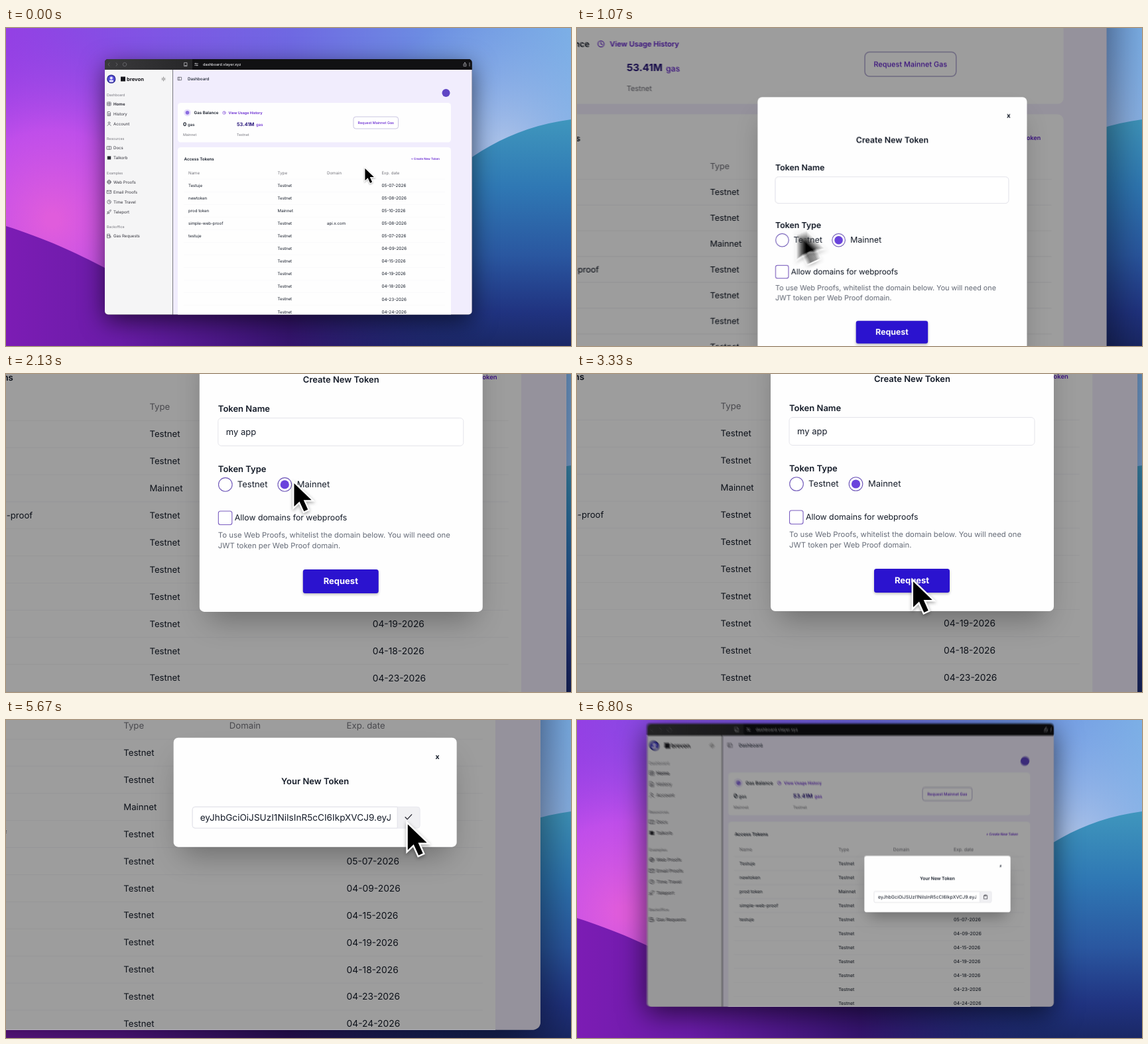
An HTML page with a canvas that plays this animation: 852 px wide and 480 px high, repeating every 6870 ms.

```html
<!DOCTYPE html>
<html lang="en">
<head>
<meta charset="utf-8">
<title>Create a token</title>
<style>
html, body { margin: 0; width: 100%; height: 100%; overflow: hidden; background: #2a1a6a; }
canvas { display: block; width: 852px; height: 480px; }
</style>
</head>
<body>
<canvas id="stage" width="852" height="480"></canvas>
<script>
const W = 852, H = 480, LOOP = 6870, STEP = 1000 / 15, SHUTTER = 16;
const ZOOM = 2.145;
const FRAME = [149, 47, 553.6, 385.5];
const out = document.getElementById('stage').getContext('2d');

function layer() {
  const c = document.createElement('canvas');
  c.width = W;
  c.height = H;
  return c.getContext('2d');
}
const back = layer(), g = layer();
g.textRendering = 'geometricPrecision';

const INK = '#141b28', GREY = '#75757d', PURPLE = '#6423d0', LINE = '#f2f2f5';

// Motion

const spring = (ms, w) => {
  const x = Math.max(0, ms) / 1000 * w;
  return 1 - (1 + x) * Math.exp(-x);
};
const ease = p => p < 0 ? 0 : p > 1 ? 1 : p * p * (3 - 2 * p);

// start, stiffness, [scale, x, y]
const HOME = [1, 0, 0];
const shots = [
  [451, 6.5, [ZOOM, -699, -261]],
  [1411, 10, [ZOOM, -662, -420]],
  [4900, 10, [ZOOM, -701.5, -460.5]],
  [5850, 10, [ZOOM, -631, -495]],
  [6304, 8, HOME]
];
function camera(t) {
  const cam = [...HOME];
  let from = HOME;
  for (const [start, w, to] of shots) {
    const p = spring(t - start, w);
    for (let i = 0; i < 3; i++) cam[i] += (to[i] - from[i]) * p;
    from = to;
  }
  return cam;
}

// start, end, x, y
const moves = [
  [150, 620, 619, 200],
  [850, 1100, 468, 268],
  [1400, 1640, 510, 269.5],
  [2600, 3200, 543.6, 338.9],
  [4850, 5450, 608, 285],
  [5800, 6350, 560, 472]
];
const clicks = [680, 2130, 3450, 5545];
function pointer(t) {
  let x = 540, y = 209;
  for (const [a, b, px, py] of moves) {
    const p = ease((t - a) / (b - a));
    x += (px - x) * p;
    y += (py - y) * p;
  }
  const press = Math.max(...clicks.map(c => Math.max(0, 1 - Math.abs(t - c) / 130)));
  return [x, y, 1 - 0.1 * press];
}

// Drawing helpers

function text(s, x, y, size, color = INK, weight = 400, align = 'left') {
  g.font = `${weight} ${size}px Inter, "Open Sans", sans-serif`;
  g.fillStyle = color;
  g.textAlign = align;
  g.fillText(s, x, y + size * 0.36);
}
function box(x, y, w, h, r, fill, stroke, lw = 0.5) {
  g.beginPath();
  g.roundRect(x, y, w, h, r);
  if (fill) { g.fillStyle = fill; g.fill(); }
  if (stroke) { g.strokeStyle = stroke; g.lineWidth = lw; g.stroke(); }
}
function disc(x, y, r, fill, stroke, lw) {
  box(x - r, y - r, 2 * r, 2 * r, r, fill, stroke, lw);
}
function icon(d, x, y, color = '#50505a', lw = 0.7, k = 1) {
  g.save();
  g.translate(x, y);
  g.scale(k, k);
  g.strokeStyle = color;
  g.lineWidth = lw;
  g.lineCap = g.lineJoin = 'round';
  g.stroke(new Path2D(d));
  g.restore();
}
function shadow(color, blur, dy, scale) {
  g.shadowColor = color;
  g.shadowBlur = blur * scale;
  g.shadowOffsetY = dy * scale;
}
function noShadow() { g.shadowColor = 'transparent'; }

const RING = 'M2.8 0A2.8 2.8 0 1 1 -2.8 0A2.8 2.8 0 1 1 2.8 0';
const ICON = {
  grid: 'M-2.5-2.5H2.5V2.5H-2.5ZM0-2.5V2.5M-2.5 0H2.5',
  doc: 'M-2-3H1L2-2V3H-2ZM-1 0H1M-1 1.5H1',
  user: 'M-2.6 2.8C-2 .4 2 .4 2.6 2.8M1.4-1.4A1.4 1.4 0 1 1-1.4-1.4A1.4 1.4 0 1 1 1.4-1.4',
  book: 'M-3-2.2H3V2.2H-3ZM0-2.2V2.2',
  globe: RING + 'M-2.8 0H2.8M0-2.8C-2-1-2 1 0 2.8C2 1 2-1 0-2.8',
  mail: 'M-3-2.2H3V2.2H-3ZM-3-2L0 .4L3-2',
  clock: RING + 'M0-1.6V0L1.2.7',
  rocket: 'M-2.8 2.8L-1.4.2C0-2 1.4-2.8 2.8-2.8C2.8-1.4 2 0-.2 1.4ZM-1.4.2L-2.8.2M-.2 1.4V2.8',
  pump: 'M-2.6-2.8H1V2.8H-2.6ZM-2.6-.5H1M1 0H2.4V2.4',
  clip: 'M-2-4H-5V6H5V-4H2M-2-5.5H2V-2.8H-2Z'
};

// Background

function linear(c, x0, y0, x1, y1, stops) {
  const gr = c.createLinearGradient(x0, y0, x1, y1);
  stops.forEach(([p, color]) => gr.addColorStop(p, color));
  return gr;
}
function paintBack(c) {
  c.fillStyle = linear(c, 0, 0, W, 60, [[0, '#9440e4'], [0.25, '#8054e4'], [0.5, '#6f68e2'], [0.75, '#6c8ee2'], [1, '#7cb0e6']]);
  c.fillRect(0, 0, W, H);

  const pink = c.createRadialGradient(70, 290, 10, 70, 290, 290);
  pink.addColorStop(0, '#e05cdc');
  pink.addColorStop(0.45, 'rgba(200,80,235,.85)');
  pink.addColorStop(1, 'rgba(150,64,228,0)');
  c.fillStyle = pink;
  c.fillRect(0, 0, 400, H);

  const haze = c.createRadialGradient(750, 180, 10, 750, 180, 210);
  haze.addColorStop(0, '#a8c0e8');
  haze.addColorStop(1, 'rgba(130,170,230,0)');
  c.fillStyle = haze;
  c.fillRect(540, 0, 312, H);

  c.fillStyle = linear(c, 0, 138, 0, H, [[0, '#3f96bd'], [0.3, '#2f78b4'], [0.6, '#2a57a0'], [0.85, '#203380'], [1, '#1a2866']]);
  c.beginPath();
  c.moveTo(400, H);
  c.lineTo(400, 428);
  c.lineTo(640, 250);
  c.bezierCurveTo(690, 195, 760, 150, W, 138);
  c.lineTo(W, H);
  c.fill();

  c.fillStyle = linear(c, 0, 0, W, 0, [[0, '#7c1cb4'], [0.2, '#6a1ca8'], [0.5, '#35146e'], [0.85, 'rgba(28,40,112,0)']]);
  c.beginPath();
  c.moveTo(0, 299);
  c.bezierCurveTo(60, 318, 105, 339, 149, 362);
  c.bezierCurveTo(230, 405, 330, 425, 430, 425);
  c.lineTo(W, 425);
  c.lineTo(W, H);
  c.lineTo(0, H);
  c.fill();
}

// Dashboard

function paintChrome() {
  g.fillStyle = '#111113';
  g.fillRect(149, 47, 554, 16);
  g.fillStyle = linear(g, 149, 0, 281, 0, [[0, '#3a3a3c'], [1, '#262628']]);
  g.fillRect(149, 47, 132, 16);
  icon('M1-2.4L-1 0L1 2.4M11-2.4L13 0L11 2.4', 155, 55, '#727276');
  icon(RING, 179, 55, '#727276');
  icon('M-2-2.6H2V2.6H-2ZM-1 1.6H1', 271, 55, '#c8c8cc');
  icon('M-2.4-1.3H2.4M-2.4 1.3H2.4M-1-2V-.6M1 .6V2', 287, 55, '#d5d5d8');
  text('dashboard.vlayer.xyz', 297, 55, 5.6, '#e8e8ea', 500);
  icon('M-1.2-.8H-2V2.6H2V-.8H1.2M0 1V-3M-1-2L0-3L1-2M7-2.6V2.6', 692, 55, '#b5b5ba');
}

const groups = [
  ['Dashboard', 101], ['Resources', 167.5], ['Examples', 219], ['Backoffice', 300.5]
];
const items = [
  ['Home', 114.5, 'grid'], ['History', 129.5, 'doc'], ['Account', 144.5, 'user'],
  ['Docs', 181, 'book'], ['Talkorb', 196, ''],
  ['Web Proofs', 232.5, 'globe'], ['Email Proofs', 247.5, 'mail'],
  ['Time Travel', 262.5, 'clock'], ['Teleport', 277.5, 'rocket'],
  ['Gas Requests', 314, 'pump']
];
function paintSidebar() {
  g.fillStyle = '#f5f5f6';
  g.fillRect(149, 63, 102, 370);
  g.fillStyle = '#85858d';
  g.fillRect(251, 63, 0.8, 370);
  disc(158.8, 77, 6.6, '#2b2a8e');
  disc(158.8, 77, 5.2, '#5a52dc');
  disc(158.8, 75.6, 2.1, '#e9e6ff');
  box(155.6, 78.4, 6.4, 3, 1.5, '#e9e6ff');
  box(173, 73.5, 7, 7, 0, '#16161c');
  text('brevon', 182, 77, 7.6, '#16161c', 700);
  disc(237.5, 77, 1.3, null, '#555', 0.6);
  icon('M0-3V-2.3M0 2.3V3M-3 0H-2.3M2.3 0H3M-2-2L-1.6-1.6M2 2L1.6 1.6M-2 2L-1.6 1.6M2-2L1.6-1.6', 237.5, 77, '#555', 0.6);
  for (const [name, y] of groups) text(name, 152, y, 5.3, '#75757d');
  for (const [name, y, kind] of items) {
    if (kind) icon(ICON[kind], 155.5, y);
    else box(152.8, y - 2.5, 5.4, 5, 0, '#26262e');
    text(name, 162, y, 6.15, '#33333c', name === 'Home' ? 700 : 400);
  }
}

const names = ['Testuje', 'newtoken', 'prod token', 'simple-web-proof', 'testuje'];
const dates = ['05-07', '05-08', '05-10', '05-08', '05-07', '04-09', '04-15', '04-19', '04-18', '04-23', '04-24'];
function paintMain() {
  g.fillStyle = '#f1edfd';
  g.fillRect(251.8, 63, 452, 370);
  icon('M-2.6-2.2H2.6V2.2H-2.6ZM-1-2.2V2.2', 262, 76.5);
  text('Dashboard', 274, 76.5, 6.2, INK, 500);
  disc(663.5, 98, 6, '#5f45c4');

  box(259, 113, 412, 59.5, 4.5, '#fefefe');
  disc(273.5, 127.8, 5.4, '#e7defb');
  disc(273.5, 127.8, 2.8, '#8a6ce0');
  text('Gas Balance', 283.5, 128, 6.2, INK, 600);
  icon(ICON.clock, 329, 128, PURPLE, 0.7, 0.8);
  text('View Usage History', 335.5, 128, 5.4, PURPLE, 600);
  text('0', 267, 145.5, 7.8, INK, 700);
  text('gas', 274, 146.2, 6, INK, 500);
  text('Mainnet', 267, 161, 5.3, GREY);
  text('53.41M', 348, 145.5, 7.4, '#2b1a7c', 700);
  text('gas', 377, 146.2, 6, PURPLE, 500);
  text('Testnet', 348, 161, 5.3, GREY);
  box(524, 134, 67.5, 18, 3.5, '#fff', '#b4acd4', 0.7);
  text('Request Mainnet Gas', 557.7, 143, 5.35, PURPLE, 500, 'center');

  box(259, 180, 412, 270, 4.5, '#fefefe');
  text('Access Tokens', 268.5, 197.7, 6.2, INK, 600);
  text('+ Create New Token', 654, 197.6, 4.45, PURPLE, 600, 'right');
  const cols = [[275, 'Name'], [409.6, 'Type'], [484, 'Domain'], [566.4, 'Exp. date']];
  for (const [x, name] of cols) text(name, x, 218.5, 6.15, GREY);
  dates.forEach((d, i) => {
    const y = 237.6 + 19.07 * i;
    g.fillStyle = LINE;
    g.fillRect(268, y - 9.7, 394, 0.4);
    text(names[i] || '', 275, y, 6.15);
    text(i === 2 ? 'Mainnet' : 'Testnet', 409.6, y, 6.15);
    if (i === 3) text('api.x.com', 484, y, 6.15);
    text(d + '-2026', 566.4, y, 6.45);
  });
}

// Dialogs use the coordinates of the zoomed view.

function panel(y, bottom, title, titleY, scale) {
  shadow('rgba(0,0,0,.3)', 44, 24, scale / ZOOM);
  box(304, y + 12, 403, bottom - y - 24, 7, '#fefefe');
  noShadow();
  box(292, y, 427, bottom - y, 7, '#fefefe');
  text('x', 690, y + 29, 10.5, INK, 700, 'center');
  text(title, 505.5, titleY, 13, INK, 600, 'center');
}
function paintForm(t, scale) {
  panel(-61, 358, 'Create New Token', 7, scale);
  text('Token Name', 320, 51, 13, INK, 600);
  box(320, 65.5, 370, 42, 5, '#fff', '#e4e4ea', 1);
  const typed = Math.max(0, Math.floor((t - 1050) / 55));
  text('my app'.slice(0, typed), 332, 86, 13);
  text('Token Type', 320, 142, 13, INK, 600);
  disc(331, 166, 10.3, '#fff', '#6d55b8', 1.1);
  text('Testnet', 349, 165.5, 13);
  disc(420.5, 166, 10.3, '#fff', '#6d55b8', 1.1);
  disc(420.5, 166, 6.6, '#6a43dc');
  text('Mainnet', 439, 165.5, 13);
  box(320.5, 206, 20.5, 20.5, 3, '#fff', '#7a5cc0', 1.1);
  text('Allow domains for webproofs', 345, 216, 12.3);
  text('To use Web Proofs, whitelist the domain below. You will need one', 320, 241.5, 11.35, '#666c78');
  text('JWT token per Web Proof domain.', 320, 257.5, 11.35, '#666c78');
  shadow('rgba(0,0,0,.25)', 4, 2, scale / ZOOM);
  box(448, 294, 114, 36, 3.5, '#2b13cf');
  noShadow();
  text('Request', 505, 311.5, 13, '#fff', 700, 'center');
}
function paintToken(t, scale) {
  panel(67, 232, 'Your New Token', 133, scale);
  box(320.5, 171.5, 343, 32, 4, '#f0f0f3', '#e8e8ee', 1);
  box(320.5, 171.5, 309, 32, [4, 0, 0, 4], '#fff', '#e1e1e8', 1);
  g.save();
  g.beginPath();
  g.rect(325, 172, 294, 31);
  g.clip();
  text('eyJhbGciOiJSUzI1NiIsInR5cCI6IkpXVCJ9.eyJ', 332, 187.5, 13.6);
  g.restore();
  if (t > 5590 && t < 6500) icon('M-4.5 0L-1.5 3.2L5-3.8', 646, 187, '#2a2a33', 1.4);
  else icon(ICON.clip, 646, 187, '#2a2a33', 1.3);
}

const ARROW = new Path2D('M3 6.5V45.5L12 37L19.5 53.5L26 50.5L18.8 34.5H32Z');
function paintPointer([x, y, k], scale) {
  g.save();
  g.translate(x, y);
  g.scale(k / ZOOM, k / ZOOM);
  shadow('rgba(0,0,0,.35)', 5, 2, scale / ZOOM);
  g.strokeStyle = '#fff';
  g.lineWidth = 5;
  g.lineJoin = 'miter';
  g.stroke(ARROW);
  noShadow();
  g.fillStyle = '#000';
  g.fill(ARROW);
  g.restore();
}

function paint(t, [scale, x, y], hand) {
  g.setTransform(1, 0, 0, 1, 0, 0);
  g.drawImage(back.canvas, 0, 0);
  g.setTransform(scale, 0, 0, scale, x, y);
  shadow('rgba(0,0,0,.6)', 36, 10, scale);
  box(...FRAME, 5, '#222');
  noShadow();
  g.save();
  g.beginPath();
  g.roundRect(...FRAME, 5);
  g.clip();
  paintMain();
  paintSidebar();
  paintChrome();
  if (t > 800) {
    g.fillStyle = 'rgba(0,0,0,.385)';
    g.fillRect(...FRAME);
    g.save();
    g.translate(662 / ZOOM, 420 / ZOOM);
    g.scale(1 / ZOOM, 1 / ZOOM);
    if (t < 3650) paintForm(t, scale);
    else paintToken(t, scale);
    g.restore();
  }
  paintPointer(hand, scale);
  g.restore();
}

// Averages several moments within the shutter for motion blur.
function render(t) {
  const at = d => [camera(t + d * SHUTTER), pointer(t + d * SHUTTER)];
  const [c0, p0] = at(-0.5), [c1, p1] = at(0.5);
  const travel = Math.abs(c1[0] - c0[0]) * 400 + Math.hypot(c1[1] - c0[1], c1[2] - c0[2]) +
    Math.hypot(p1[0] - p0[0], p1[1] - p0[1]) * c0[0];
  const n = travel < 0.5 ? 1 : Math.min(12, 4 + Math.ceil(travel));
  for (let i = 0; i < n; i++) {
    paint(t, ...at((i + 0.5) / n - 0.5));
    out.globalAlpha = 1 / (i + 1);
    out.drawImage(g.canvas, 0, 0);
  }
}

paintBack(back);
let last = -1;
const begin = performance.now();
function tick() {
  const ms = (performance.now() - begin) % LOOP;
  const step = Math.min(102, Math.floor((ms + 4) / STEP));
  if (step !== last) render(step * STEP);
  last = step;
  requestAnimationFrame(tick);
}
tick();
</script>
</body>
</html>
```
